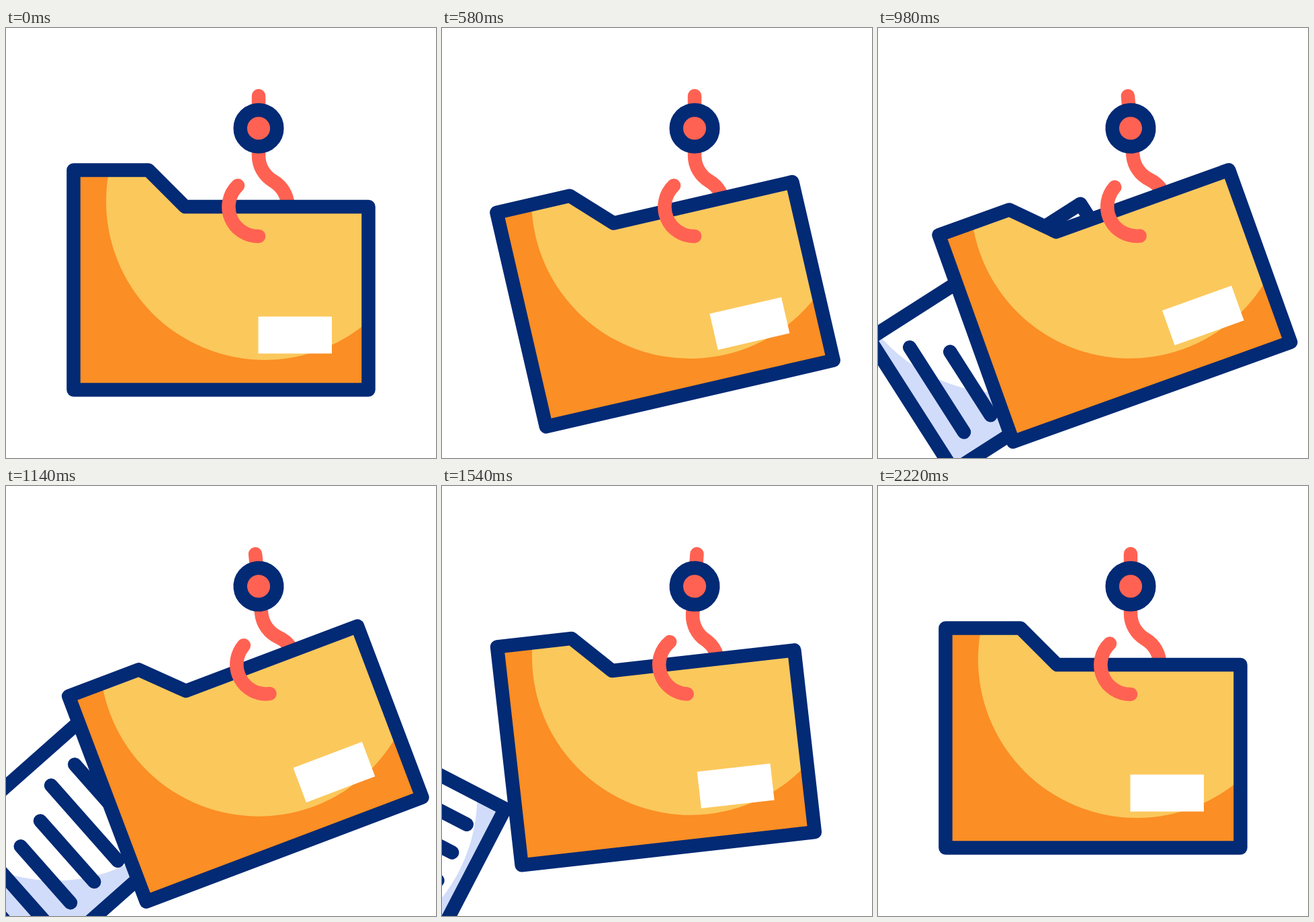
Recreate the animation shown at these times as an HTML page. Size 640 by 640 pixels, loop 2.4 s.

```html
<!DOCTYPE html>
<html>
<head>
<meta charset="utf-8">
<style>
  html, body { margin: 0; width: 100%; height: 100%; overflow: hidden; background: #fff; }
  svg { display: block; width: 100vw; height: 100vh; }
  .ink, .red { fill: none; stroke-width: 20.5; stroke-linecap: round; stroke-linejoin: round; }
  .ink { stroke: #022a75; }
  .red { stroke: #ff6252; }
</style>
</head>
<body>
<svg viewBox="0 0 640 640">
  <defs>
    <path id="folder" d="M100.5 211.5H212L266.5 266H539.5V538.5H100.5Z"/>
    <clipPath id="inFolder"><use href="#folder"/></clipPath>
    <clipPath id="inPaper"><rect width="233" height="373"/></clipPath>
  </defs>

  <g class="sway">
    <path class="red" d="M376 101V190A44 44 0 0 0 398 228A44 44 0 0 1 419.5 266"/>
    <circle class="ink" cx="376" cy="149.3" r="27.3" style="fill:#ff6252"/>
  </g>

  <g id="paper">
    <rect width="233" height="373" fill="#d1dcfa"/>
    <circle cx="-30" cy="115" r="245" fill="#fff" clip-path="url(#inPaper)"/>
    <rect class="ink" width="233" height="373"/>
    <path class="ink" d="M72 47H193M93 94H193M43 141H193M43 188H193M72 235H193M81 282H193M43 329H193"/>
  </g>

  <g class="sway">
    <g id="tilt">
      <use href="#folder" fill="#fb8e24"/>
      <circle cx="385" cy="258" r="236" fill="#fbc85c" clip-path="url(#inFolder)"/>
      <path d="M375.5 429.5H485V484.5H375.5Z" fill="#fff"/>
      <use href="#folder" class="ink"/>
    </g>
    <path class="red" d="M345 234.5A43.8 43.8 0 0 0 376 310"/>
  </g>
</svg>
<script>
  const LOOP = 2400;
  const sways = document.querySelectorAll('.sway');
  const paper = document.getElementById('paper');
  const tilt = document.getElementById('tilt');
  const move = (el, value) => el.setAttribute('transform', value);

  // Sine ease from 0 to 1 between two times.
  function ease(t, from, to) {
    const p = Math.min(1, Math.max(0, (t - from) / (to - from)));
    return (1 - Math.cos(Math.PI * p)) / 2;
  }

  function draw(t) {
    const lean = ease(t, 205, 695);
    const back = ease(t, 690, 1100);
    const forth = ease(t, 1100, 1700);
    const rest = ease(t, 1700, 2210);

    const swing = -6 * back + 12 * forth - 6 * rest;
    sways.forEach(g => move(g, `rotate(${swing} 376 149.3)`));

    const angle = -14.9 * lean + 5.3 * forth + 9.6 * rest;
    const dx = -2 * back + 8.5 * forth - 6.5 * rest;
    const dy = -back - 1.5 * forth + 2.5 * rest;
    move(tilt, `translate(${dx} ${dy}) rotate(${angle} 368.5 327)`);

    // The paper slides out at a nearly steady pace.
    const p = (t - 720) / 820;
    const q = p + 0.02 * Math.sin(Math.PI * p);
    move(paper, `translate(${359 - 454 * q} ${394 + 198 * q}) rotate(${72.5 - 45 * q}) translate(-116.5 -186.5)`);
    paper.style.display = t > 720 && t < 1800 ? '' : 'none';
  }

  const start = performance.now();
  function frame() {
    draw((performance.now() - start) % LOOP);
    requestAnimationFrame(frame);
  }
  frame();
</script>
</body>
</html>
```
